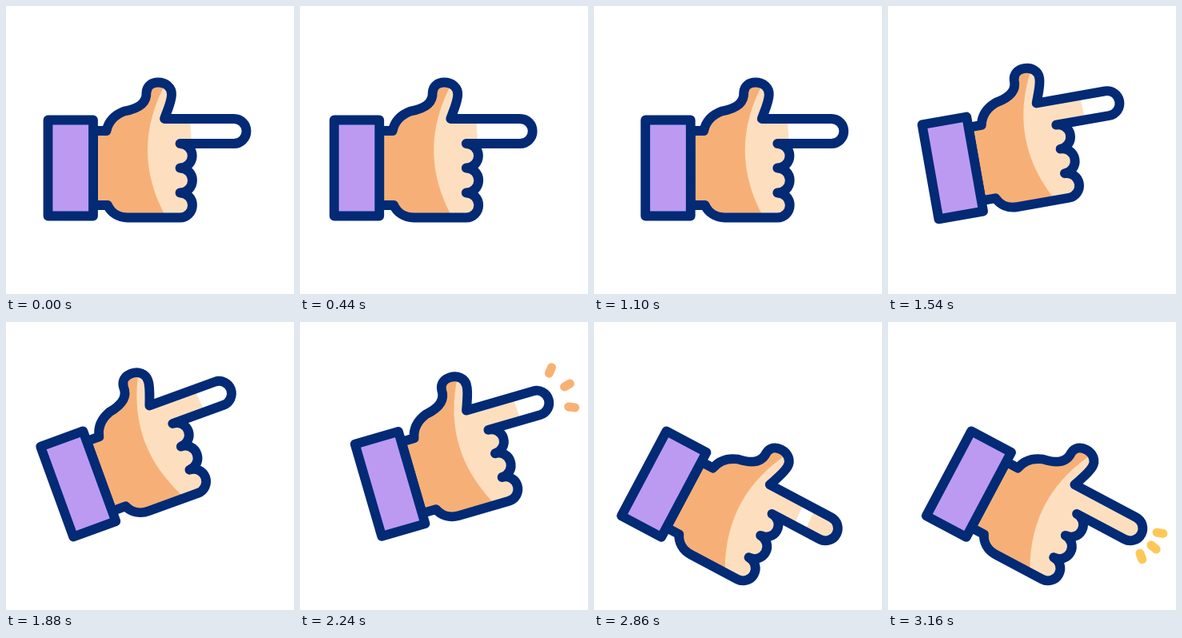
Animation, 360 px wide and 360 px high, one loop 3180 ms. Source, as an HTML page:

```html
<!DOCTYPE html>
<html lang="en">
<head>
<meta charset="utf-8">
<title>Pointing hand</title>
<style>
  html, body { margin: 0; width: 100%; height: 100%; overflow: hidden; background: #fff; }
  svg { display: block; width: 100vw; height: 100vh; }
  .line { fill: none; stroke: #022a75; stroke-width: 11.8; stroke-linejoin: round; stroke-linecap: round; }
</style>
</head>
<body>
<svg viewBox="0 0 360 360">
  <defs>
    <path id="outline" d="M109 156H125.500C128 144 136 136 148 131.500C165 128.500 176 122 175.500 108
      C176 100 182 95.500 190 95.500C200 95.500 207.500 102 207 111C207 119 202 130 198 141
      H285A15.500 15.500 0 0 1 285 172H217.500A15.250 15.250 0 0 1 217.500 202.500
      A15.500 15.500 0 0 1 217.500 233.500A15.500 15.500 0 0 1 217.500 264.500H152
      C140 264.500 131 258 127 249H109Z"/>
    <clipPath id="inside"><use href="#outline"/></clipPath>
  </defs>
  <g id="hand">
    <g clip-path="url(#inside)">
      <rect x="100" y="85" width="210" height="190" fill="#f6b077"/>
      <path d="M201 94C171 148 167 205 201 266H310V85H206Z" fill="#fddfbf"/>
      <path id="gap" fill="#fff"/>
    </g>
    <use href="#outline" class="line"/>
    <rect x="52.5" y="142.500" width="56.500" height="120" fill="#bc9af2"/>
    <rect x="52.5" y="142.500" width="56.500" height="120" class="line"/>
    <g id="sparks" fill="none" stroke-width="11" stroke-linecap="round"></g>
  </g>
</svg>
<script>
const LOOP = 3180, STEP = 20;
const PIVOT = [80.5, 202.5], TIP = [285, 156.5];
const SPARK_LEAD = 170, SPARK_LIFE = 290;

// Each thrust of the hand, with the fan of sparks it throws
const pokes = [
  { start: 700, peak: 1300, reach: 21, aim: 0, spread: 38, color: "#f8b172" },
  { start: 1640, peak: 2300, reach: 32.5, aim: -14, spread: 37, color: "#f8b172" },
  { start: 2620, peak: 3260, reach: 21.5, aim: 11, spread: 30, color: "#fdc858" }
];

const hand = document.getElementById("hand");
const gap = document.getElementById("gap");
const sparks = document.getElementById("sparks");
const rays = [-1, 0, 1].map(side => {
  const path = document.createElementNS("http://www.w3.org/2000/svg", "path");
  return { side, path: sparks.appendChild(path) };
});

// Eased 0 to 1 between two times
function ramp(t, from, to) {
  const p = Math.min(1, Math.max(0, (t - from) / (to - from)));
  return (1 - Math.cos(Math.PI * p)) / 2;
}

function slideAt(t) {
  const windUp = -16 * (ramp(t, 200, 620) - ramp(t, 700, 1300));
  return pokes.reduce((x, { start, peak, reach }) =>
    x + reach * (ramp(t, start, peak) - ramp(t, peak, peak + 250)), windUp);
}

function tiltAt(t) {
  return -20 * ramp(t, 1290, 1790) + 4 * ramp(t, 1900, 2300) + 44 * ramp(t, 2320, 2620);
}

// The unpainted part of the finger shrinks towards the tip, then closes
function drawGap(t) {
  const turn = ramp(t, 2320, 2560);
  const a = 230 + 28 * ramp(t, 1150, 1700) - 25 * turn + 29 * ramp(t, 2640, 3100);
  const b = Math.max(a, 305 - 43 * turn);
  gap.setAttribute("d", `M${a} 141H${b}L${b + 2} 172H${a + 2}Z`);
  gap.style.display = b > a ? "" : "none";
}

function drawSparks(t) {
  const ageOf = poke => t - poke.peak + SPARK_LEAD;
  const poke = pokes.find(p => ageOf(p) >= 0 && ageOf(p) < SPARK_LIFE);
  sparks.style.display = poke ? "" : "none";
  if (!poke) return;
  const age = ageOf(poke);
  const dist = 26 + Math.min(25, age * 0.165);
  const half = 4 * Math.min(1, age / 60, (SPARK_LIFE - age) / 60);
  sparks.setAttribute("stroke", poke.color);
  for (const { side, path } of rays) {
    const a = (poke.aim + side * poke.spread) * Math.PI / 180;
    const at = r => `${TIP[0] + r * Math.cos(a)} ${TIP[1] + r * Math.sin(a)}`;
    path.setAttribute("d", `M${at(dist - half)}L${at(dist + half)}`);
  }
}

function draw(t) {
  hand.setAttribute("transform",
    `translate(${slideAt(t)} 0) rotate(${tiltAt(t)} ${PIVOT})`);
  drawGap(t);
  drawSparks(t);
}

const begin = performance.now();
function tick() {
  const t = (performance.now() - begin) % LOOP;
  draw(Math.floor(t / STEP) * STEP);
  requestAnimationFrame(tick);
}
tick();
</script>
</body>
</html>
```
